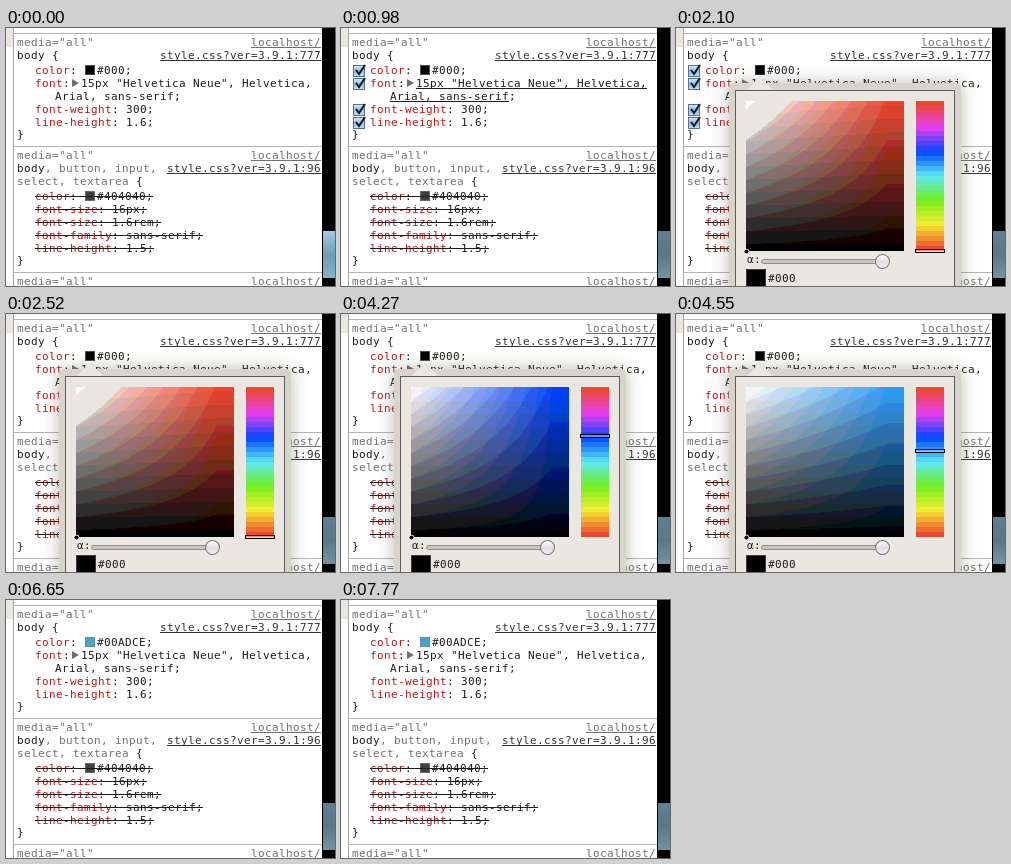
An HTML page with a canvas that plays this animation: 329x258 px, repeating every 8400 ms.

```html
<!DOCTYPE html>
<html lang="en">
<head>
<meta charset="utf-8">
<title>Picking a color in the style inspector</title>
<style>
html, body { margin: 0; width: 100%; height: 100%; overflow: hidden; background: #fff; }
canvas { display: block; }
</style>
</head>
<body>
<canvas id="stage" width="329" height="258"></canvas>
<script>
const LOOP = 8400, CELL = 7;
const INK = '#1c1c1c', GRAY = '#707070', NAME = '#b01818', BEIGE = '#e9e7df';
const PICK = { x: 70, y: 73, w: 158, h: 150 };
const ctx = document.getElementById('stage').getContext('2d');

// Display tones of red, yellow, green, cyan, blue, magenta
const WHEEL = [[236, 74, 48], [244, 236, 50], [112, 240, 30], [96, 232, 248], [0, 72, 255], [232, 62, 240]];

const mix = (a, b, k) => a.map((v, i) => v + (b[i] - v) * k);
const css = c => `rgb(${c.map(Math.round)})`;
const between = (t, a, b) => t >= a && t < b;

function hueTone(deg) {
  const h = (deg % 360) / 60, i = Math.floor(h);
  return mix(WHEEL[i], WHEEL[(i + 1) % 6], h - i);
}

function tone(hue, s, v) {
  return mix([255, 255, 255], hueTone(hue), Math.min(1, s * 1.12)).map(c => c * v);
}

function hex(hue, s, v) {
  const part = n => {
    const k = (n + hue / 60) % 6;
    return Math.round(255 * v * (1 - s * Math.max(0, Math.min(k, 4 - k, 1))));
  };
  return '#' + [5, 3, 1].map(n => part(n).toString(16).padStart(2, '0')).join('').toUpperCase();
}

function rect(x, y, w, h, fill) {
  ctx.fillStyle = fill;
  ctx.fillRect(x, y, w, h);
}

function frame(x, y, w, h, color) {
  ctx.strokeStyle = color;
  ctx.lineWidth = 1;
  ctx.strokeRect(x + .5, y + .5, w - 1, h - 1);
}

function shape(points, fill) {
  ctx.beginPath();
  points.forEach(p => ctx.lineTo(...p));
  ctx.closePath();
  ctx.fillStyle = fill;
  ctx.fill();
}

function disc(x, y, r, fill) {
  ctx.beginPath();
  ctx.arc(x, y, r, 0, 7);
  ctx.fillStyle = fill;
  ctx.fill();
}

// Monospaced text on a whole-pixel grid; returns the end
function text(s, x, y, color = INK) {
  ctx.font = '11px "DejaVu Sans Mono", monospace';
  ctx.fillStyle = color;
  [...s].forEach((c, i) => ctx.fillText(c, x + i * CELL, y));
  return x + s.length * CELL;
}

function link(s, y, color) {
  const x = 315 - s.length * CELL;
  text(s, x, y, color);
  rect(x, y + 1, s.length * CELL, 1, color);
}

function prop(name, value, y, struck) {
  const x = text(name, 29, y, NAME);
  const end = text(': ' + value + ';', x, y);
  if (struck) rect(29, y - 4, end - 29, 1, INK);
}

function colorProp(value, fill, y, hover, struck) {
  text(':', text('color', 29, y, NAME), y);
  rect(79, y - 9, 10, 10, fill);
  frame(79, y - 9, 10, 10, hover ? 'rgba(64,64,64,.8)' : 'rgba(128,128,128,.6)');
  const end = text(value + ';', 91, y);
  if (struck) rect(29, y - 4, end - 29, 1, INK);
}

function header(y) {
  rect(8, y - 13, 308, 1, '#b4b4b4');
  text('media="all"', 11, y, GRAY);
  link('localhost/', y, GRAY);
}

function checkbox(y) {
  const g = ctx.createLinearGradient(0, y - 9, 0, y + 3);
  g.addColorStop(0, '#e2eef8');
  g.addColorStop(.5, '#8fbbe2');
  g.addColorStop(1, '#c4e4f6');
  rect(13, y - 8, 11, 11, g);
  frame(12, y - 9, 12, 12, '#56728f');
  ctx.beginPath();
  [[15, y - 4], [18, y], [24, y - 9]].forEach(p => ctx.lineTo(...p));
  ctx.strokeStyle = '#101820';
  ctx.lineWidth = 2;
  ctx.stroke();
}

function backdrop(t) {
  rect(0, 0, 316, 258, '#fff');
  rect(0, 0, 7, 19, BEIGE);
  rect(7, 0, 1, 258, '#a5a5a5');
  rect(316, 0, 13, 258, '#000');
  const tones = t < 980 ? ['#a5cbe0', '#6d9db9', '#86b2c8'] : ['#5f7f92', '#587789', '#7594a2'];
  const g = ctx.createLinearGradient(0, 203, 0, 250);
  tones.forEach((c, i) => g.addColorStop(i / 2, c));
  rect(317, 203, 12, 47, g);
}

function rules(t, value, fill) {
  header(18);
  text('body {', 11, 31);
  link('style.css?ver=3.9.1:777', 31, '#333');
  colorProp(value, fill, 46, between(t, 1680, 2450));
  text(':', text('font', 29, 59, NAME), 59);
  shape([[66, 51], [73, 55], [66, 59]], '#6e6e6e');
  const end = text('15px "Helvetica Neue", Helvetica,', 75, 59);
  const end2 = text('Arial, sans-serif;', 49, 72);
  if (between(t, 210, 1540)) {
    rect(75, 60, end - 75, 1, INK);
    rect(49, 73, end2 - CELL - 49, 1, INK);
  }
  prop('font-weight', '300', 85);
  prop('line-height', '1.6', 98);
  text('}', 11, 110);

  header(131);
  text(', button, input,', text('body', 11, 144), 144, GRAY);
  link('style.css?ver=3.9.1:96', 144, '#333');
  text(' {', text('select, textarea', 11, 157, GRAY), 157);
  colorProp('#404040', '#404040', 172, false, true);
  prop('font-size', '16px', 185, true);
  prop('font-size', '1.6rem', 198, true);
  prop('font-family', 'sans-serif', 211, true);
  prop('line-height', '1.5', 224, true);
  text('}', 11, 236);

  header(257);

  if (between(t, 210, 2520) || between(t, 6720, 7770)) [46, 59, 85, 98].forEach(checkbox);
}

const field = document.createElement('canvas');
field.width = PICK.w;
field.height = PICK.h;
let fieldHue = -1;

// Saturation across, brightness down, in flat bands of tone
function paintField(hue) {
  if (hue === fieldHue) return;
  fieldHue = hue;
  const { w, h } = PICK, fctx = field.getContext('2d'), img = fctx.createImageData(w, h);
  for (let y = 0, i = 0; y < h; y++) {
    for (let x = 0; x < w; x++, i += 4) {
      let c = tone(hue, x / (w - 1), 1 - y / (h - 1));
      const low = Math.min(...c);
      if (hue === 360 && low > 190) c = low > 243 ? [255, 255, 255] : [232, 230, 222];
      else c = c.map(v => Math.min(255, Math.round(v / 22) * 22));
      img.data.set([...c, 255], i);
    }
  }
  fctx.putImageData(img, 0, 0);
}

function popover(hue, dot, value, fill) {
  ctx.save();
  ctx.shadowColor = 'rgba(96,90,66,.42)';
  ctx.shadowBlur = 18;
  ctx.beginPath();
  ctx.roundRect(53, 55, 232, 240, 5);
  ctx.fillStyle = '#d6d4cb';
  ctx.fill();
  ctx.restore();

  shape([[71, 62], [84, 48], [97, 62]], BEIGE);
  rect(59, 62, 220, 200, BEIGE);
  frame(59, 62, 220, 200, '#5c5c5a');

  paintField(hue);
  ctx.drawImage(field, PICK.x, PICK.y);
  const band = 5;
  for (let y = 0; y < PICK.h; y += band) {
    rect(240, PICK.y + y, 28, band, css(hueTone(360 * (1 - y / (PICK.h - band)))));
  }

  const mark = PICK.y + Math.round(PICK.h * (1 - (hue % 360) / 360));
  rect(240, mark - 1, 28, 2, 'rgba(255,255,255,.35)');
  frame(239, mark - 2, 30, 4, '#000');

  disc(dot.x + .5, dot.y + .5, 2.8, '#fff');
  disc(dot.x + .5, dot.y + .5, 2.1, '#000');

  text('α:', 71, 235);
  ctx.beginPath();
  ctx.roundRect(85.5, 231.5, 125, 4, 2);
  ctx.fillStyle = '#c6c5c0';
  ctx.fill();
  ctx.strokeStyle = '#8e8e8b';
  ctx.stroke();
  disc(206.5, 233.5, 7.5, '#777');
  const g = ctx.createLinearGradient(0, 227, 0, 241);
  g.addColorStop(0, '#fff');
  g.addColorStop(.5, '#dedede');
  g.addColorStop(1, '#f8f8f8');
  disc(206.5, 233.5, 6.5, g);

  rect(70, 241, 20, 20, fill);
  frame(70, 241, 20, 20, 'rgba(90,90,90,.7)');
  text(value, 92, 254);
}

// Progress of a drag seen in steps of 70 ms
function drag(t, start, steps) {
  return Math.max(0, Math.min(1, (Math.floor((t - start) / 70) + 1) / steps));
}

function draw(t) {
  let hue = 360, dot = { x: 70, y: 223 }, value = '#000', fill = '#000';
  if (t >= 4270) hue = 242.4 + (189.6 - 242.4) * drag(t, 4480, 3);
  if (t >= 5110) {
    const k = drag(t, 5250, 4);
    dot = { x: 204 + 24 * k, y: 112 - 10 * k };
    const s = (dot.x - PICK.x) / PICK.w, v = 1 - (dot.y - PICK.y) / PICK.h;
    value = hex(hue, s, v);
    fill = css(tone(hue, s, v));
  }
  backdrop(t);
  rules(t, value, fill);
  if (between(t, 2100, 6650)) popover(hue, dot, value, fill);
}

const begin = performance.now();
function tick() {
  draw((performance.now() - begin) % LOOP);
  requestAnimationFrame(tick);
}
tick();
</script>
</body>
</html>
```
